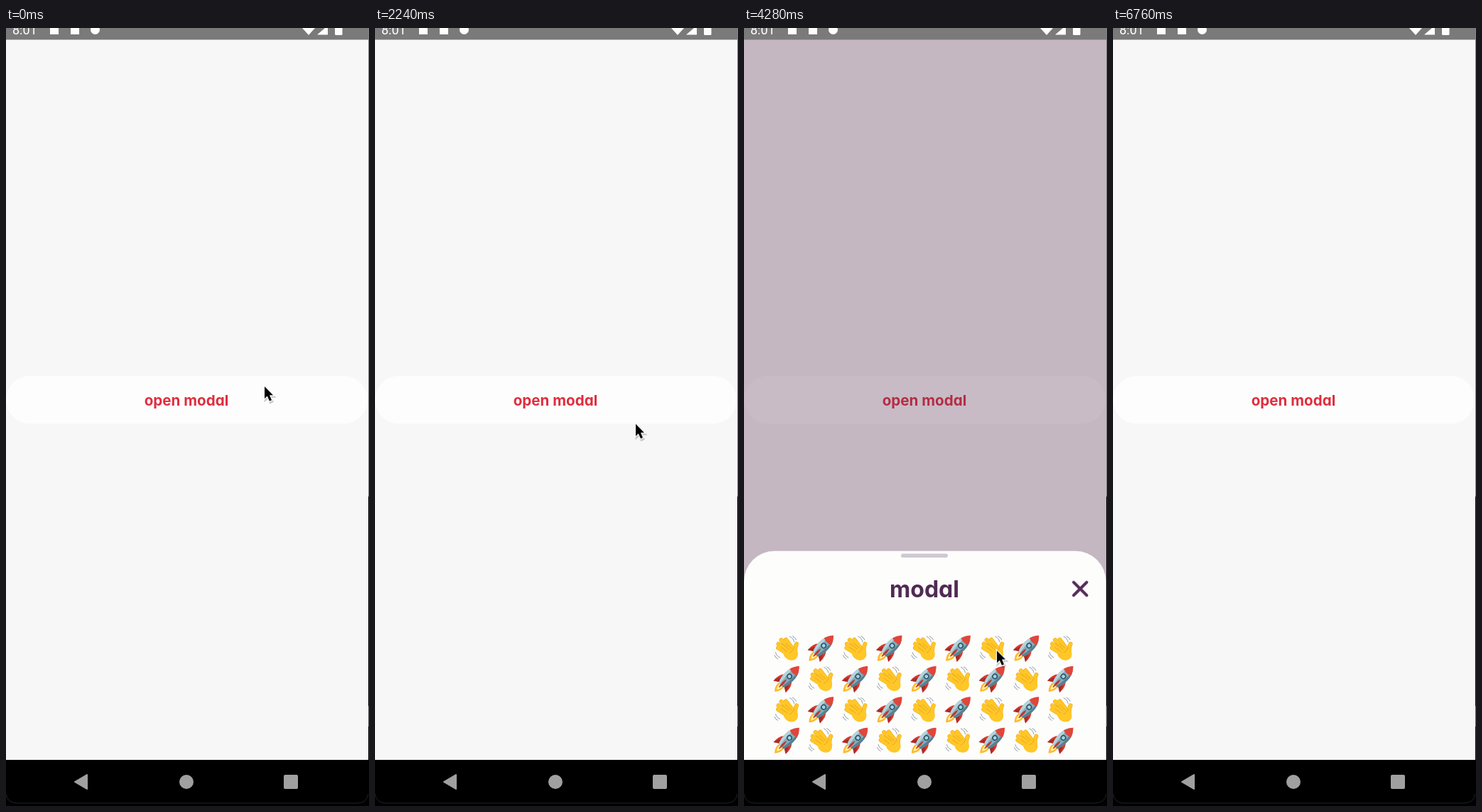
An HTML page for the animation above (6.92 s loop, 511 by 1096 pixels).

```html
<!DOCTYPE html>
<html lang="en">
<head>
<meta charset="utf-8">
<title>Bottom sheet</title>
<style>
/* --open: how far the sheet is raised, 0 to 1 */
@property --open { syntax: "<number>"; inherits: true; initial-value: 0; }

html, body { margin: 0; width: 100%; height: 100%; overflow: hidden; background: #000; }
svg { display: block; width: 511px; height: 1096px; }
#stage { animation: sheet 6920ms infinite; }
#backdrop { fill: #552b4c; opacity: calc(.435 * var(--open) * var(--open)); }
#sheet { transform: translateY(calc((1 - var(--open)) * 346px)); }
#cursor { animation: pointer 6920ms infinite; animation-timing-function: ease-in-out; }
#close { animation: press 6920ms infinite linear; }

.label { font: 700 20.6px Inter, Lato, sans-serif; fill: #e02d3e; }
.title { font: 700 32px Inter, Lato, sans-serif; fill: #502a54; }
.label, .title { text-anchor: middle; font-feature-settings: "cv11"; }
.clock { font: 400 18px Roboto, sans-serif; fill: #fff; }

@keyframes sheet {
  0%, 4.62% { --open: 0; animation-timing-function: cubic-bezier(.2, .8, .3, 1); }
  13.29% { --open: 1; }
  21.46% { --open: 1; animation-timing-function: cubic-bezier(.42, 0, 1, 1); }
  26.01% { --open: 0; }
  39.02% { --open: 0; animation-timing-function: cubic-bezier(.2, .8, .3, 1); }
  47.69% { --open: 1; }
  53.18% { --open: 1; animation-timing-function: ease-in; }
  61.85% { --open: .851; animation-timing-function: ease-out; }
  64.45% { --open: .79; animation-timing-function: ease-in; }
  66.47% { --open: .9; animation-timing-function: ease-out; }
  71.1% { --open: 1; }
  73.99% { --open: 1; animation-timing-function: ease-in; }
  77.46% { --open: .705; animation-timing-function: linear; }
  81.21% { --open: .4; animation-timing-function: ease-in; }
  85.55%, 100% { --open: 0; }
}
@keyframes pointer {
  0%, 5.78% { transform: translate(364px, 505px); }
  19.5%, 23.7% { transform: translate(470px, 738px); }
  32.37% { transform: translate(367px, 558px); animation-timing-function: ease-out; }
  35.84%, 39.88% { transform: translate(365px, 528px); }
  49.13%, 51.45% { transform: translate(350px, 778px); }
  52.6% { transform: translate(350px, 783px); }
  61.85% { transform: translate(356px, 877px); animation-timing-function: ease-out; }
  64.45% { transform: translate(357px, 900px); animation-timing-function: ease-in; }
  66.47% { transform: translate(358px, 855px); animation-timing-function: ease-out; }
  71.39% { transform: translate(394px, 776px); }
  73.99% { transform: translate(394px, 776px); animation-timing-function: ease-in; }
  77.46% { transform: translate(397px, 878px); animation-timing-function: linear; }
  81.21%, 83.82% { transform: translate(398px, 985px); }
  94.22% { transform: translate(487px, 858px); animation-timing-function: linear; }
  97.69%, 100% { transform: translate(516px, 846px); }
}
@keyframes press {
  0%, 20.5% { opacity: 1; }
  21.5%, 22.5% { opacity: .85; }
  24%, 100% { opacity: 1; }
}
</style>
</head>
<body>
<svg id="stage" viewBox="0 0 511 1096">
  <defs>
    <path id="fingers" d="M3 9L-12.500-.5M4 5L-12-6M6 3L-8-11.500M9 2L-1.500-12M12 7Q11-1 13.500-6"/>
    <g id="hand" fill="none" stroke-linecap="round" stroke-linejoin="round">
      <path d="M4-16.500Q9-14.500 10-9M8-17Q12-15 13-12M-16 6Q-15 11-10 13M-17.500 10Q-16 14-13 15" stroke="#8b9aa3"/>
      <use href="#fingers" stroke="#f0a51e" stroke-width="6"/>
      <use href="#fingers" stroke="#ffc727" stroke-width="5"/>
      <ellipse cx="5" cy="7" rx="11" ry="9.500" transform="rotate(40 5 7)" fill="#ffc727"/>
      <path d="M-8-1L0 4.500M-6-6L3 1.500M-2-7L6 0M10-1Q8 5 4 6" stroke="#e8a020" stroke-width=".9"/>
    </g>
    <g id="rocket" transform="rotate(44)">
      <path d="M-4.500 11Q-6.500 18 0 25Q6.500 18 4.500 11Z" fill="#ffb62e"/>
      <path d="M-2.500 11Q-3.500 17 0 21Q3.500 17 2.500 11Z" fill="#fff09a"/>
      <path d="M-6-3Q-13 2-12 15L-4 10ZM6-3Q13 2 12 15L4 10Z" fill="#d63a2f"/>
      <path d="M-7 4Q-11 8-12 15L-4 10ZM7 4Q11 8 12 15L4 10Z" fill="#aa2b29"/>
      <path d="M0-24Q8-17 8-5Q8 6 4.500 12H-4.500Q-8 6-8-5Q-8-17 0-24Z" fill="#82aebd"/>
      <path d="M-3-21Q-8-15-8-5Q-8 6-4.500 12H-2Q-5-5-3-21Z" fill="#b5d2da"/>
      <path d="M4-20Q8-14 8-5Q8 6 4.500 12H2Q6-4 4-20Z" fill="#58808f"/>
      <path d="M0-25Q5-20 7-13Q0-10-7-13Q-5-20 0-25Z" fill="#e2453a"/>
      <circle cy="-5" r="4" fill="#36515e"/>
      <circle cy="-5" r="2.400" fill="#9bd7ee"/>
      <path d="M0 2Q2 7 0 16Q-2 7 0 2Z" fill="#c2342e" stroke="#c2342e"/>
    </g>
    <clipPath id="screen"><path d="M0 0H510V1096H0Z"/></clipPath>
  </defs>

  <g clip-path="url(#screen)">
    <path d="M0 0H510V1031H0Z" fill="#f7f7f7"/>
    <rect y="490" width="509" height="67.500" rx="33.700" fill="#fdfdfd"/>
    <text class="label" x="254" y="532">open modal</text>
    <path id="backdrop" d="M0 16H510V1031H0Z"/>

    <g id="sheet">
      <rect y="685" width="509.500" height="460" rx="43" fill="#fdfdfc"/>
      <rect x="221" y="688.700" width="66" height="5.600" rx="2.800" fill="#cfc9d1"/>
      <text class="title" x="254" y="750">modal</text>
      <path id="close" d="M464 729L482.500 747.500M482.500 729L464 747.500" stroke="#552c5a" stroke-width="4" stroke-linecap="round"/>
      <g id="grid"></g>
    </g>

    <path d="M0 0H510V16.500H0Z" fill="#7a7a7a"/>
    <text class="clock" x="9" y="9">8:01</text>
    <g fill="#fff">
      <path d="M62 0H74V9H62ZM91 0H103V9H91Z"/>
      <circle cx="125.500" cy="2.500" r="6.500"/>
      <path d="M417 0H435L426 10ZM438 9.500L449 0H453V9.500Z"/>
      <rect x="463" y="-3" width="10.500" height="13" rx="1.500"/>
    </g>

    <path d="M0 1031H510V1096H0Z"/>
    <path d="M0 1079Q2 1092 16 1092H494Q508 1092 510 1079" fill="none" stroke="#1d2626"/>
    <g fill="#a0a0a0">
      <path d="M97 1062L114 1052V1072Z" stroke="#a0a0a0" stroke-width="2" stroke-linejoin="round"/>
      <circle cx="254" cy="1062" r="10"/>
      <rect x="391" y="1052" width="20" height="20" rx="2"/>
    </g>

    <g id="cursor">
      <path d="M0 0V17L3.800 13.500L7 20.500L10 19.200L7 12.300H12Z" transform="translate(1 2)" opacity=".2" stroke="#000" stroke-width="3"/>
      <path d="M0 0V17L3.800 13.500L7 20.500L10 19.200L7 12.300H12Z" stroke="#fff" stroke-width="2.200" paint-order="stroke"/>
    </g>
  </g>

  <path d="M510 0H511V660H510Z" fill="#858585"/>
  <path d="M510 955H511V984H510Z" fill="#555"/>
</svg>
<script>
const grid = document.getElementById("grid");
for (let row = 0; row < 4; row++) {
  for (let col = 0; col < 9; col++) {
    const use = document.createElementNS("http://www.w3.org/2000/svg", "use");
    use.setAttribute("href", (row + col) % 2 ? "#rocket" : "#hand");
    use.setAttribute("x", 60.5 + col * 48.2);
    use.setAttribute("y", 822 + row * 43.3);
    grid.append(use);
  }
}
</script>
</body>
</html>
```
